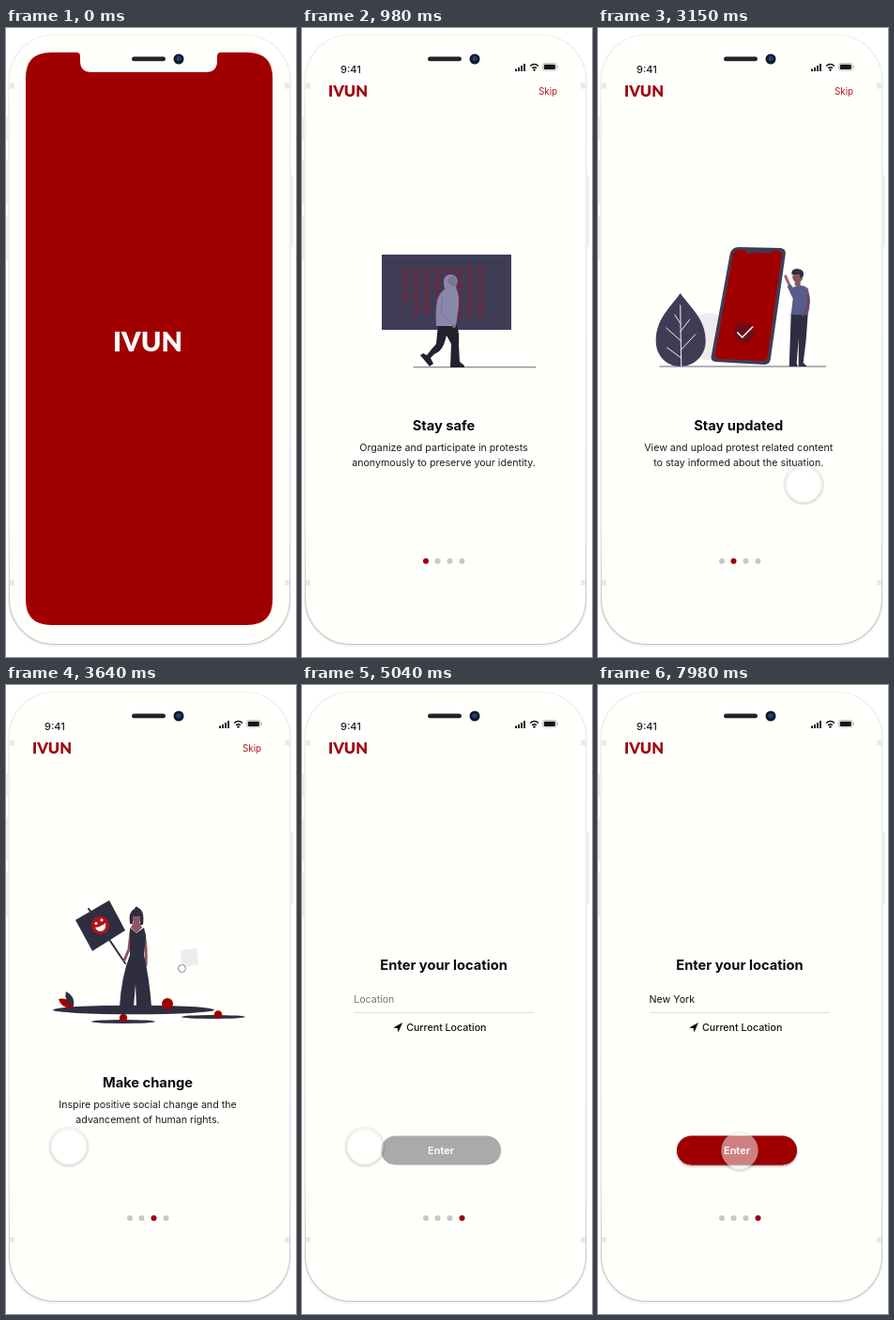
Recreate the animation shown at these times as an HTML page. Size 309x669 px, loop 8000 ms.

```html
<!DOCTYPE html>
<html lang="en">
<head>
<meta charset="utf-8">
<title>App onboarding</title>
<style>
  html, body { margin: 0; width: 100%; height: 100%; overflow: hidden; background: #fff; }
  svg { display: block; width: 309px; height: 669px; }
  text { font: 400 10.65px Inter, "Open Sans", sans-serif; fill: #1c1c22; }
  .mid { text-anchor: middle; }
  .title { font-size: 14.7px; font-weight: 700; fill: #0c0c10; }
  .logo { font-family: Lato, sans-serif; font-weight: 900; }
</style>
</head>
<body>
<svg viewBox="0 0 309 669" xmlns="http://www.w3.org/2000/svg">
  <defs>
    <clipPath id="screenClip"><rect x="21" y="26" width="263" height="609" rx="27"/></clipPath>
    <filter id="soft" x="-30%" y="-30%" width="160%" height="160%"><feGaussianBlur stdDeviation="1.3"/></filter>
    <linearGradient id="edge" x1="0" y1="0" x2="0" y2="1">
      <stop offset="0" stop-color="#f0f0f0"/><stop offset=".8" stop-color="#e4e4e6"/><stop offset="1" stop-color="#c4c4c6"/>
    </linearGradient>
  </defs>

  <g id="phone">
    <g fill="#fff" stroke="#dcdcde" stroke-width="1">
      <rect x="1" y="95" width="5" height="24" rx="1.5"/>
      <rect x="1" y="141" width="5" height="46" rx="1.5"/>
      <rect x="1" y="200" width="5" height="47" rx="1.5"/>
      <rect x="299" y="157" width="6" height="75" rx="1.5"/>
    </g>
    <rect x="4" y="9" width="298" height="647" rx="47" fill="none" stroke="#ccc" stroke-width="2" opacity=".5" filter="url(#soft)"/>
    <rect x="3.5" y="7.5" width="299" height="648" rx="48" fill="#fffffc" stroke="url(#edge)" stroke-width="1.2"/>
    <path d="M4 58.500h5v6h-5zM297 58.500h5v6h-5zM4 587h5v6h-5zM297 587h5v6h-5z" fill="#e9e9e9"/>
  </g>

  <g id="screen">
    <g clip-path="url(#screenClip)">
      <g id="pages"></g>
      <text class="logo" x="28" y="73" style="font-size:16.5px;fill:#a00710">IVUN</text>
      <text id="skip" x="252" y="71" style="font-size:9.8px;fill:#b01820">Skip</text>
      <g id="dots"></g>
    </g>
    <g id="status" fill="#15151a">
      <text x="41" y="48" style="font-size:11px;font-weight:500">9:41</text>
      <path d="M227 43.500h2v2.500h-2zM230 42h2v4h-2zM233 40h2v6h-2zM236 38h2v8h-2z"/>
      <path d="M243 40.500q4.500-4 9 0M245 42.700q2.500-2 5 0" fill="none" stroke="#15151a" stroke-width="1.5"/>
      <circle cx="247.500" cy="44.500" r="1.200"/>
      <rect x="256.500" y="37.500" width="14.500" height="7.500" rx="2" fill="none" stroke="#999" stroke-width=".6"/>
      <rect x="257.800" y="38.700" width="12" height="5.200" rx="1"/>
      <rect x="271.500" y="40" width="1" height="2.500" fill="#999"/>
    </g>
  </g>

  <g id="touch">
    <circle cy="1.200" r="19.800" fill="none" stroke="#000" stroke-opacity=".25" stroke-width="1.400" filter="url(#soft)"/>
    <circle r="19.800" fill="#fff" fill-opacity=".5"/>
  </g>

  <g id="splash">
    <path d="M48 26H75Q79 26 79 30V35Q79 47 91 47H213Q225 47 225 35V30Q225 26 229 26H257Q284 26 284 53V608Q284 635 257 635H48Q21 635 21 608V53Q21 26 48 26Z" fill="#a00000"/>
    <text class="logo mid" x="151" y="344" style="font-size:29px;fill:#fff">IVUN</text>
  </g>

  <rect x="134" y="30.500" width="36" height="4.800" rx="2.400" fill="#242426"/>
  <circle cx="184" cy="33" r="5.500" fill="#14192b"/>
  <circle cx="184" cy="32.500" r="2.600" fill="#1f3f7c"/>
</svg>

<script>
const LOOP = 8000, PAGE = 266;
const PAGE_X = [0, 264.7, 2 * PAGE, 3 * PAGE];
const RED = '#a00000', INK = '#3f3d56', DARK = '#2f2e41';
const $ = id => document.getElementById(id);
const shape = (d, fill, extra = '') => `<path d="${d}" fill="${fill}" ${extra}/>`;
const line = (d, color, width) => shape(d, 'none', `stroke="${color}" stroke-width="${width}" stroke-linecap="round" stroke-linejoin="round"`);
const dot = (x, y, r, fill) => `<circle cx="${x}" cy="${y}" r="${r}" fill="${fill}"/>`;
const oval = (x, y, rx, ry, fill) => `<ellipse cx="${x}" cy="${y}" rx="${rx}" ry="${ry}" fill="${fill}"/>`;
const label = (x, y, s, cls = 'mid', style = '', id = '') => `<text id="${id}" class="${cls}" x="${x}" y="${y}" style="${style}">${s}</text>`;
const copy = (title, a, b) => label(151, 428, title, 'mid title') + label(151, 450, a) + label(151, 466, b);

// Falling code: pairs of glyph columns of uneven length
function rain() {
  let seed = 7, out = '';
  const rnd = () => (seed = seed * 16807 % 2147483647) / 2147483647;
  for (let x = 110; x < 202; x += 11.5) {
    const end = 296 + rnd() * 15;
    for (let y = 256 + rnd() * 3; y < end; y += 4.2)
      out += label(x, y.toFixed(1), Math.floor(10 + rnd() * 90), 'mid', 'font-size:5px;fill:#a50d20');
  }
  return out;
}

const safePage = () =>
  `<rect x="85" y="241" width="138" height="80" fill="${INK}"/>` + rain() +
  line('M119 360.800H249', INK, .8) +
  shape('M145 315L165 315Q168 325 167 337L168 355L173 359V361H158L159 336L154 327Q151 340 146 344Q141 346 137 351L140 357L136 360L126 348L129 346L133 348Q140 339 143 336Z', '#22212d') +
  shape('M151 272Q150 263 158 262Q165 263 166 269L164 276Q168 284 167 296L164 317H143Q142 300 144 290Q146 282 152 278Z', '#8988ab') +
  shape('M158 264Q165 264 165 270L163 275Q157 275 155 269Z', '#77758f') +
  line('M150 287Q147 299 150 306L160 314', '#716f96', .8) +
  dot(162, 317, 2, '#9f616a') +
  copy('Stay safe', 'Organize and participate in protests', 'anonymously to preserve your identity.');

const updatedPage = () =>
  dot(119, 328, 25, '#ececee') +
  line('M67 360H244', INK, .8) +
  shape('M89 282C100 298 116 309 116 333C116 349 103 360 89 360C75 360 63 349 63 333C63 309 78 298 89 282Z', INK) +
  line('M89 295L90 360M89 314L83 305M89 323L99 310M90 333L74 319M90 342L105 326M90 351L75 340', '#f2f2f4', 1) +
  shape('M151 233L196 234Q202 235 201 241L185 353Q184 358 178 358L126 355Q121 354 122 349L142 240Q144 233 151 233Z', INK) +
  shape('M152 236L158 236L160 239H186L189 236L194 237Q198 238 197 242L182 350Q181 354 177 354L129 352Q125 351 126 347L145 241Q147 236 152 236Z', RED) +
  line('M151 260L188 261M149 272L186 273M147 285L184 286M144 299L180 301', '#8a0510', .8) +
  dot(157, 324, 11, '#6d0d18') + line('M150 324L155 329L166 318', '#fff', 1.6) +
  line('M211 280L206 275L201 264', '#a0616a', 3) +
  shape('M207 303H225L223 332L220 356L224 360H215L215 330L213 356L214 360H205Z', DARK) +
  shape('M209 276Q218 271 225 277Q229 291 225 305H207L209 288L203 275L206 272Z', '#585c8c') +
  line('M225 284Q228 294 220 306', '#6e4550', 2.500) +
  shape('M211 266H217V274H211Z', '#8b555f') +
  dot(214, 265, 5.500, '#8b555f') + shape('M208 263Q206 256 214 256Q222 257 220 264L217 266L216 262H209Z', DARK) +
  copy('Stay updated', 'View and upload protest related content', 'to stay informed about the situation.');

const changePage = () =>
  oval(136, 345.5, 86, 4.8, DARK) + oval(125, 358, 34, 2, DARK) + oval(221, 353, 34, 2, DARK) +
  dot(172, 339, 6, RED) + dot(125, 354, 4.2, RED) + dot(226, 350.500, 4.2, RED) +
  shape('M72 343Q59 345 56 334Q66 331 72 343Z', RED) + shape('M72 342Q61 336 64 326Q74 331 72 342Z', DARK) +
  line('M88 238L127 296', DARK, 2) +
  shape('M74 250L110 229L127 261L92 283Z', DARK) +
  dot(100.5, 255.5, 9.5, '#b3121c') +
  dot(96, 253.500, 1.5, '#fff') + dot(102, 250, 1.5, '#fff') + shape('M95 258Q102 257 106 253Q107 261 101 262Q97 262 95 258Z', '#fff') +
  line('M133 263L131 281L126 293M147 264Q150 280 149 298', '#8f5560', 3) +
  shape('M132 258L139 264L147 258L149 267L147 287Q153 314 155 342H139L138 318L136 342H121Q123 310 132 287Z', DARK) +
  shape('M136 252H142L145 258L139 264L133 258Z', '#8f5560') +
  oval(139, 248, 4.5, 6, '#8f5560') +
  shape('M132 254Q130 241 137 238Q138 234 141 237Q148 240 146 255L143 255L143 246H135L135 254Z', DARK) +
  shape('M186 282L203 280L205 298L187 300Z', '#ededef') +
  '<circle cx="187.500" cy="301.500" r="4" fill="#fffffc" stroke="#777" stroke-width=".9"/>' +
  copy('Make change', 'Inspire positive social change and the', 'advancement of human rights.');

const button = (fill, attrs) => `<rect x="84" y="479.500" width="128" height="31" rx="15.500" fill="${fill}" ${attrs}/>`;
const locationPage = () =>
  label(151, 303, 'Enter your location', 'mid title') +
  label(55, 338, 'Location', '', 'fill:#777', 'hint') +
  label(54.5, 338, 'New York', '', 'fill:#111', 'city') +
  line('M55 348.500H246', '#e0e0e0', 1) +
  shape('M97 364.500L107 359L102.500 369.500L101.500 365Z', '#0c0c10') +
  label(111, 367.500, 'Current Location', '', 'font-weight:500;fill:#111') +
  button('#aaa', '') +
  '<g id="active">' + button('#000', 'opacity=".3" transform="translate(0 1.5)" filter="url(#soft)"') + button(RED, '') + '</g>' +
  label(148, 498.500, 'Enter', 'mid', 'fill:#fff;font-weight:600;font-size:11px');

$('pages').innerHTML = [safePage, updatedPage, changePage, locationPage]
  .map((draw, i) => `<g transform="translate(${PAGE_X[i]})">${draw()}</g>`).join('');
$('dots').innerHTML = [132, 144.5, 157.5, 170.5].map(x => dot(x, 567, 3, '#c8c8c8')).join('');

const clamp = v => Math.min(1, Math.max(0, v));
const span = (t, start, length) => clamp((t - start) / length);
const easeOut = (p, power) => 1 - (1 - p) ** power;
const smooth = p => p * p * (3 - 2 * p);
const mix = (a, b, p) => a + (b - a) * p;

// Touch pointer stops: time, x, y
const STOPS = [
  [1390, 172, 594], [1760, 189, 534], [2050, 189, 534], [2152, 55, 530], [2550, 62, 530],
  [3060, 240, 484], [3110, 240, 484], [3190, 200, 485], [3380, 67, 490], [3780, 67, 490],
  [4480, 240, 488], [4570, 240, 488], [4800, 67, 490], [5200, 67, 490],
  [5890, 156, 364], [6740, 156, 364], [7700, 151, 495], [8000, 151, 495]
];

function pointer(t) {
  const i = Math.max(1, STOPS.findIndex(s => s[0] > t));
  const [t0, x0, y0] = STOPS[i - 1], [t1, x1, y1] = STOPS[i];
  const p = smooth(span(t, t0, t1 - t0));
  return [mix(x0, x1, p), mix(y0, y1, p)];
}

function render(t) {
  const shown = easeOut(span(t, 290, 900), 4.7);
  $('screen').setAttribute('opacity', shown);
  $('splash').setAttribute('opacity', 1 - shown);

  const page = [2056, 3155, 4580].reduce((sum, start) => sum + easeOut(span(t, start, 500), 3), 0);
  $('pages').setAttribute('transform', `translate(${-page * PAGE})`);
  $('skip').setAttribute('opacity', clamp(3 - page));
  [...$('dots').children].forEach((el, i) => {
    const on = easeOut(clamp(1 - Math.abs(page - i)), 2);
    el.setAttribute('fill', `rgb(${mix(200, 160, on)},${mix(200, 0, on)},${mix(200, 10, on)})`);
  });

  const filled = easeOut(span(t, 6180, 300), 2);
  $('hint').setAttribute('opacity', 1 - filled);
  $('city').setAttribute('opacity', filled);
  $('active').setAttribute('opacity', filled);

  const [x, y] = pointer(t);
  $('touch').setAttribute('transform', `translate(${x} ${y})`);
  $('touch').setAttribute('opacity', span(t, 1390, 150));
}

const begin = performance.now();
function tick() {
  render((performance.now() - begin) % LOOP);
  requestAnimationFrame(tick);
}
tick();
</script>
</body>
</html>
```
